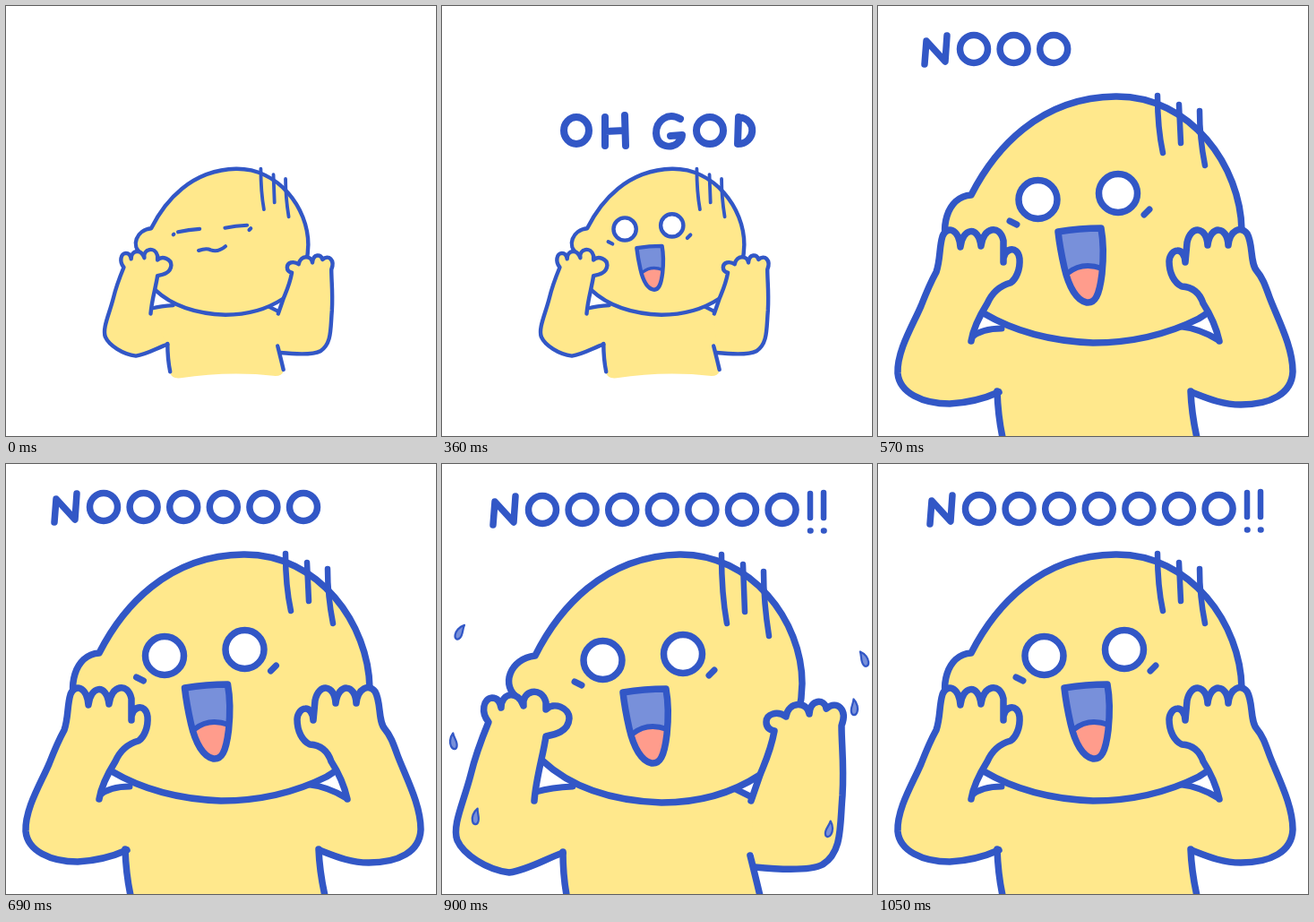
These frames come from a looping animation (480 by 480 pixels, 1080 ms). An HTML page with a canvas:

```html
<!DOCTYPE html>
<html lang="en">
<head>
<meta charset="utf-8">
<title>Oh god no</title>
<style>
html, body { margin: 0; width: 100%; height: 100%; overflow: hidden; background: #fff; }
canvas { display: block; }
</style>
</head>
<body>
<canvas id="stage" width="480" height="480" role="img" aria-label="OH GOD NOOOOOOO!!"></canvas>
<script>
const ctx = document.getElementById('stage').getContext('2d');
const BLUE = '#3257c6', SKIN = '#ffe88c', PALE = '#7890da', TONGUE = '#ff9c8c';
const STEP = 30, STEPS = 36;
const ZOOM_AT = 18, SCALE = 1.7;
const path = d => new Path2D(d);

// Two alternating poses, in close-up coordinates
const arms = {
  out: {
    head: path('M104 214C130 162 180 103 265 101C345 100 402 175 402 245C401 290 385 325 355 347C320 370 280 378 245 378C190 376 145 362 112 331C90 305 90 280 86 262C64 248 76 217 104 214Z'),
    torso: path('M104 368Q122 361 145 360L240 340L325 360L347 372L385 410L344 437L355 485Q352 494 340 494Q250 484 160 498Q142 500 140 487L135 433L80 410Z'),
    shoulders: path('M105 366Q122 361 146 360M324 361L346 372'),
    sides: path('M135 433Q135 462 140 486M344 437Q351 465 355 482'),
    limbs: [
      path('M135 434C115 441 96 453 75 456C50 453 24 436 17 420C11 404 24 378 32 347C38 322 45 305 52 288C43 277 46 262 56 261Q64 261 66 272C66 255 85 252 91 270C88 253 111 247 116 266L116 274C125 265 142 272 142 284C141 299 126 302 116 304C113 325 105 350 103 376'),
      path('M349 450C380 453 412 454 425 447C447 433 444 405 447 370C449 335 446 315 446 292C453 274 441 263 429 273C427 262 411 262 410 279C408 265 387 264 384 282C374 275 362 279 362 288Q362 296 371 298C367 320 361 332 355 347L345 376')
    ],
    lines: path('M312 101Q312 145 318 178M336 112L338 165M359 120Q359 155 365 192')
  },
  cheeks: {
    head: path('M104 211C130 160 180 102 265 101C350 100 405 180 406 250C408 300 390 330 358 349C320 368 280 376 240 376C190 374 150 362 118 343C95 325 85 300 80 275C68 250 76 213 104 211Z'),
    torso: path('M104 370Q118 361 136 360L240 340L335 357Q360 360 380 373L390 405L349 430L356 485Q352 494 340 494Q250 484 160 498Q142 500 140 487L133 430L90 405Z'),
    shoulders: path('M104 370Q116 360 138 360M333 357Q360 360 380 373'),
    sides: path('M133 430Q134 460 140 486M349 430Q350 455 356 482'),
    limbs: [
      path('M135 431C117 439 100 443 80 444C50 444 24 432 22 410C21 385 39 356 48 335C55 317 60 306 65 297C70 282 68 270 72 257C77 245 90 248 92 269C94 248 112 244 115 268C117 247 136 243 140 262L140 286C139 270 156 266 158 282C159 294 154 305 148 309Q130 314 122 332Q107 356 104 374'),
      path('M350 431C368 438 384 445 405 445C438 445 462 433 463 408C463 380 446 349 437 325C432 311 429 303 423 296C415 287 419 266 412 254C405 245 393 250 391 267C390 245 371 244 368 267C367 246 349 244 345 264L343 286C342 268 326 270 325 285C325 299 331 309 339 313Q357 314 363 332Q376 352 381 374')
    ],
    lines: path('M312 100Q312 136 318 164M336 110L338 153M359 117Q359 148 365 178')
  }
};

const mouth = path('M201 252Q225 248 249 248Q253 270 250 299C247 324 242 332 233 331C222 329 213 314 208 292Q203 270 201 252Z');
const tongue = path('M209 300Q228 284 253 294L253 340L205 340Z');
const lip = path('M212 298Q228 285 250 293');
const tears = path('M147 240L155 244M297 233L303 227');
const calm = path('M155 221Q175 216 196 215M244 213Q264 209 286 208M146 226L147 225M290 217L293 214M194 256Q209 251 217 255Q231 260 245 248');

const words = {
  OH: path('M164 139A14 15 0 1 1 136 139A14 15 0 1 1 164 139M182 124L182 156M204 122L205 156M182 140L204 139'),
  GOD: path('M266 126C252 118 239 128 239 142C240 158 257 160 264 152Q268 149 268 144L255 145M314 139A15 15 0 1 1 284 139A15 15 0 1 1 314 139M331 124L330 154C350 154 353 126 331 124')
};
const letterN = path('M-55 17L-53 -9L-32 14L-30 -15');

const dropShape = path('M-19 -1C-9 -9 3 -9 10 -6C19 -2 18 6 10 7C1 9 -8 1 -19 -1Z');
// start, middle and end of each drop's arc
const drops = [
  [110, 202, 64, 160, 20, 188],
  [100, 249, 34, 261, 13, 310],
  [100, 320, 64, 330, 38, 394],
  [374, 178, 430, 178, 471, 218],
  [371, 229, 434, 226, 460, 272],
  [375, 332, 423, 348, 432, 408]
];
const bursts = [4, 24], BURST = 6;

// step, offset x, offset y
const faceKeys = [[0, 0, 0], [7, -3, 1], [16, -3, -2], [19, 0, 0], [23, -1.5, -2], [30, 1, 3], [35, 7, -2]];
const cryKeys = [[16, 110, 56], [19, 107, 48], [23, 109, 48], [27, 111, 46], [30, 112, 51], [35, 113, 50]];

function at(keys, n) {
  let i = 0;
  while (i < keys.length - 2 && n > keys[i + 1][0]) i++;
  const a = keys[i], b = keys[i + 1];
  const k = Math.max(0, Math.min(1, (n - a[0]) / (b[0] - a[0])));
  return [a[1] + (b[1] - a[1]) * k, a[2] + (b[2] - a[2]) * k];
}

function ink(shape, width, fill) {
  if (fill) { ctx.fillStyle = fill; ctx.fill(shape); }
  ctx.lineWidth = width;
  ctx.strokeStyle = BLUE;
  ctx.stroke(shape);
}

function ring(x, y, r, width, fill) {
  const p = new Path2D();
  p.arc(x, y, r, 0, Math.PI * 2);
  ink(p, width, fill);
}

function drawFace(n) {
  if (n < 3) return ink(calm, 7);
  ctx.save();
  ctx.translate(...at(faceKeys, n));
  ring(178.5, 216, 21.5, 7.5, '#fff');
  ring(268, 209, 21.5, 7.5, '#fff');
  ink(tears, 7);
  ctx.fillStyle = PALE;
  ctx.fill(mouth);
  ctx.save();
  ctx.clip(mouth);
  ctx.fillStyle = TONGUE;
  ctx.fill(tongue);
  ctx.restore();
  ink(lip, 6);
  ink(mouth, 7.5);
  ctx.restore();
}

function drawFigure(n) {
  const pose = n % 2 ? arms.cheeks : arms.out;
  ctx.save();
  if (n < ZOOM_AT) {
    ctx.scale(1 / SCALE, 1 / SCALE);
    ctx.translate(171.5, 208);
  }
  ctx.fillStyle = SKIN;
  ctx.fill(pose.torso);
  ink(pose.shoulders, 7);
  ink(pose.head, 7.5, SKIN);
  ink(pose.lines, 6.5);
  drawFace(n);
  for (const limb of pose.limbs) ink(limb, 7.5, SKIN);
  ink(pose.sides, 7.5);
  ctx.restore();
}

function drawCry(n) {
  const count = Math.min(7, 1 + Math.floor((n - 16) * 0.72 + 0.1));
  ctx.save();
  ctx.translate(...at(cryKeys, n));
  ink(letterN, 7.5);
  for (let i = 0; i < count; i++) ring(i * 44.6, 0, 15.5, 7.5);
  for (let i = 0; i < 2; i++) {
    if (n < 26 + i) break;
    const x = 299 + i * 15;
    ink(path(`M${x} ${-18 - i}L${x} 9`), 6.5);
    ink(path(`M${x} 23.5L${x + 0.5} 23.5`), 6.5);
  }
  ctx.restore();
}

function drawDrops(u) {
  const v = 1 - u, size = 0.5 + 0.5 * Math.sin(Math.PI * u);
  for (const [x0, y0, mx, my, x1, y1] of drops) {
    const cx = 2 * mx - (x0 + x1) / 2, cy = 2 * my - (y0 + y1) / 2;
    const dx = v * (cx - x0) + u * (x1 - cx), dy = v * (cy - y0) + u * (y1 - cy);
    ctx.save();
    ctx.translate(v * v * x0 + 2 * u * v * cx + u * u * x1, v * v * y0 + 2 * u * v * cy + u * u * y1);
    ctx.rotate(Math.atan2(dy, dx));
    ctx.scale(size, x0 < 240 ? -size : size);
    ink(dropShape, 4.5, PALE);
    ctx.restore();
  }
}

function draw(now) {
  const n = Math.floor(now / STEP) % STEPS;
  ctx.fillStyle = '#fff';
  ctx.fillRect(0, 0, 480, 480);
  ctx.lineCap = ctx.lineJoin = 'round';
  drawFigure(n);
  if (n < ZOOM_AT) {
    if (n >= 4) ink(words.OH, 8);
    if (n >= 6) ink(words.GOD, 8);
  }
  if (n >= 16) drawCry(n);
  for (const start of bursts) {
    const u = (n - start) / BURST;
    if (u >= 0 && u <= 1) drawDrops(u);
  }
}

const begin = performance.now();
function tick() {
  draw(performance.now() - begin);
  requestAnimationFrame(tick);
}
tick();
</script>
</body>
</html>
```
